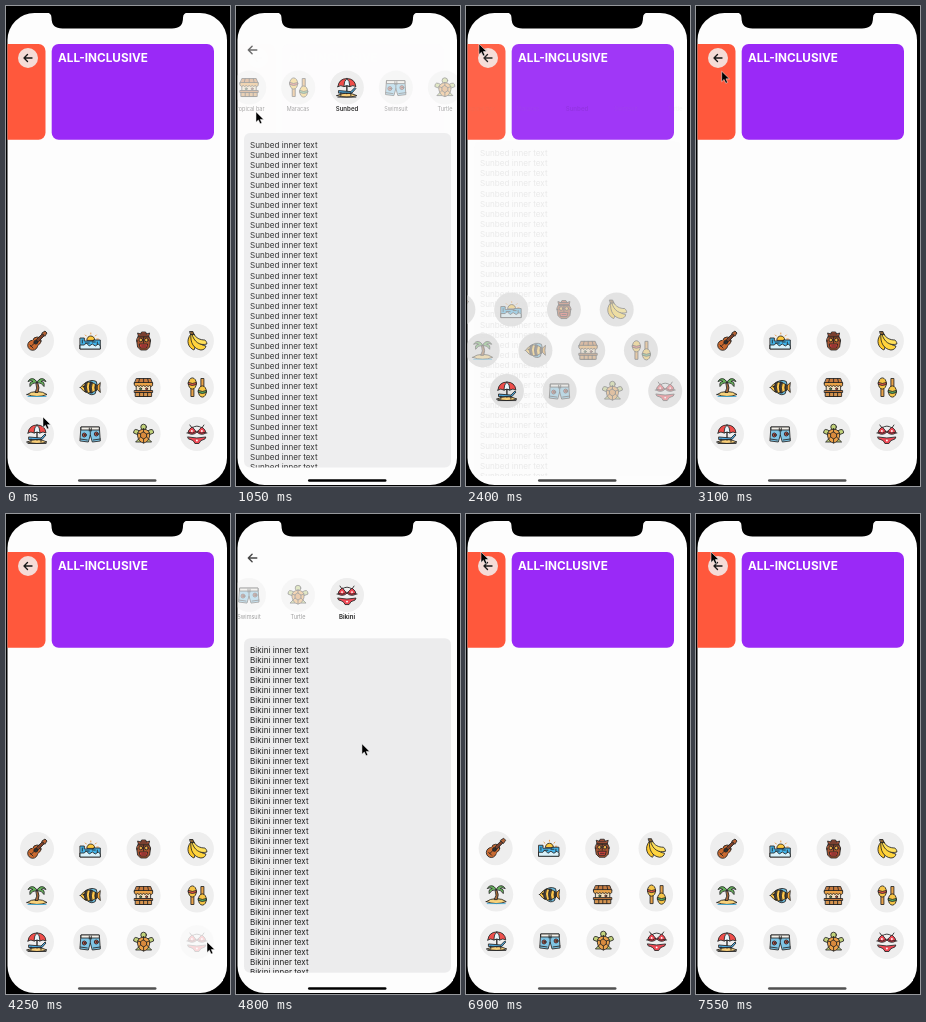
Write an HTML page that moves like this. It is 224 px wide and 480 px high and loops after 7.6 s.

```html
<!DOCTYPE html>
<html lang="en">
<head>
<meta charset="utf-8">
<title>Holiday icons</title>
<style>
html, body { margin: 0; width: 100%; height: 100%; overflow: hidden; background: #000; }
svg { display: block; font-family: Inter, sans-serif; }
#stage { width: 100vw; height: 100vh; }
.icon { stroke: #222; stroke-width: .85; stroke-linejoin: round; stroke-linecap: round; }
.label { font-size: 5.5px; fill: #9a9a9a; text-anchor: middle; }
.label.active { font-size: 6.1px; font-weight: 600; fill: #111; }
.arrow { fill: none; stroke: #181818; stroke-width: 1.4; stroke-linecap: round; stroke-linejoin: round; }
</style>
</head>
<body>
<svg id="stage" viewBox="0 0 224 480">
  <defs>
    <clipPath id="screen"><rect x="1.5" y="7" width="219.5" height="472" rx="27"/></clipPath>
  </defs>
  <rect width="224" height="480"/>
  <g clip-path="url(#screen)">
    <rect width="224" height="480" fill="#fdfdfd"/>
    <g id="cards">
      <rect x="-120" y="38" width="159.5" height="95.7" rx="7" fill="#ff583c"/>
      <rect x="45.7" y="38" width="162.3" height="95.7" rx="7" fill="#9a29f7"/>
      <text x="52" y="56" font-size="11.75" font-weight="700" fill="#fff">ALL-INCLUSIVE</text>
      <circle cx="22" cy="52" r="10" fill="#f5dcd7"/>
      <path class="arrow" d="M26 52h-8m3.5-3.5L18 52l3.5 3.5"/>
    </g>
    <path id="back" class="arrow" d="M20.8 44h-8.5m3.8-3.8L12.3 44l3.8 3.8"/>
    <g id="labels"></g>
    <g id="panel">
      <rect x="8" width="207" height="334.5" rx="6" fill="#ececed"/>
      <svg id="lines" x="8" width="207" height="334.5" font-size="8.1" fill="#151515"></svg>
    </g>
    <g id="icons"></g>
    <rect id="home" x="72" y="473.2" width="78.5" height="2.6" rx="1.3"/>
  </g>
  <path d="M40 6.5q5.5 0 5.5 5.5 0 10.5 11 10.5h109.500q11 0 11-10.500 0-5.500 5.500-5.500z"/>
  <path id="cursor" d="M0 0v10.5l2.4-2.3 1.7 3.8 1.8-.8-1.6-3.6h3.4z" stroke="#fff" stroke-width=".5"/>
</svg>
<script>
const LOOP = 7600, SPRING = 0.02, SUNBED = 8, BIKINI = 11;
const $ = id => document.getElementById(id);
const clamp = v => Math.max(0, Math.min(1, v));
const mix = (a, b, k) => a + (b - a) * k;

const path = (d, fill = 'none', extra = '') => `<path d="${d}" fill="${fill}" ${extra}/>`;
const dot = (x, y, r, fill, extra = '') => `<circle cx="${x}" cy="${y}" r="${r}" fill="${fill}" ${extra}/>`;
const bare = 'stroke="none"';

// Each icon is drawn around its own centre in a 20 x 20 box.
const items = [
  ['Guitar',
    dot(-4.3, 4.3, 5, '#c9692f') + dot(0, 0, 4, '#c9692f') + dot(-2.4, 2.4, 3.6, '#c9692f', bare) +
    path('M-.5-1.500 5.500-7.500 7.500-5.500 1.500.5z', '#7b4029') + path('M5-8 8-10 10-8 8-5z', '#b56133') +
    dot(-1.2, 1.2, 1.9, '#333') + path('M-7 4-4 7M-6 5.500l5-5')],
  ['Sunrise',
    path('M-3.500-1a4 4 0 0 1 8 0z', '#ffc83d') +
    path('M.5-7v-1M-4-5-5-6M5-5 6-6M-5.500-2H-7M6.500-2H8', 'none', 'stroke="#e58a2b"') +
    path('M-10-3h4v3H3v-1h7v9h-20z', '#43b4e9') + path('M-10 4h4l2-2 3 3 3-2 3 2 3-2 2 2v3h-20z', '#d8f2fb') +
    path('M-8-1v3M-5 2h4M2 1h3M7 1v2')],
  ['Tiki mask',
    path('M-5-4-6-8-3-7-2-9H2l1 2 3-1-1 4z', '#b9573a') +
    path('M-5-5H5l2 4-1 7-3 3h-6l-3-3-1-7z', '#a7532f') + path('M-4 3h8l-1 4h-6z', '#e9473f') +
    dot(-2.8, -1, 1.8, '#eeb04a') + dot(2.8, -1, 1.8, '#eeb04a') +
    path('M0-4v6M-5-4H5M-2 5h4M-7 0h1M6 0h1M-3-7h6')],
  ['Banana',
    path('M-6-7C-12 0-8 7-3 9-1 7-3 0-3-6z', '#ffc928') +
    path('M-6-7C-7 2-3 8 4 9 7 9 9 7 9 5 3 4-1 0-3-7z', '#ffd43d') +
    path('M-5-7C-3 1 3 5 10 3 10 1 9 0 8-1 3-1-1-3-3-7z', '#ffe05a') +
    path('M-7-9.500h3l1 3h-3z', '#8a6231')],
  ['Palm tree',
    path('M-10 7q4-3 10-3t10 3q-10 4-20 0z', '#f8d27a') + path('M-1-4q2 5-1 9h3q2-5 0-9z', '#a96a38') +
    path('M0-5C-2-10-7-10-9-6q4-2 5 0-4 0-3 5 2-4 7-4 5 0 7 4 1-5-3-5 1-2 5 0C7-10 2-10 0-5z', '#66b45b') +
    path('M-9 9h18', 'none', 'stroke="#3ca5d0"')],
  ['Fish',
    path('M6-1 10-5 9.500 0 10 5 6 1z', '#f1a43a') + path('M-5-4Q0-9 6-6L7-2M-3 5q4 4 8 1L6 2', '#68b7d8') +
    path('M-10 0Q-3-10 7-2v4Q-3 10-10 0z', '#ffc64a') +
    path('M-5-4.500q-2 4.500 0 9h2q-2-5 0-10zM0-5.500q-2 5 0 11h2q-2-5 0-10zM5-3q-1 3 0 6h1v-5z', '#403d42') +
    dot(-7, -.8, .5, '#222')],
  ['Tropical bar',
    path('M-7-3H7V9H-7z', '#f3dfbd') + path('M-7-9H7l2 5H-9z', '#c77b3f') +
    path('M-9-5H9v3q-1.500 2-3 0-1.500 2-3 0-1.500 2-3 0-1.500 2-3 0-1.500 2-3 0-1.500 2-3 0z', '#e9a247') +
    path('M-9 3H9v2H-9z', '#c47a3d') + path('M-8 5H8v4H-8z', '#d4934e') +
    path('M-4-9-5-5M0-9v4M4-9 5-5M-4 5v4M0 5v4M4 5v4') + dot(-3, 1.3, 1, '#59bd65') + dot(3, 1.3, 1, '#ee5148')],
  ['Maracas',
    path('M-6 1v8h3V1z', '#e9a247') + path('M4 0v-9h3v9z', '#e9a247') +
    `<ellipse cx="-4.500" cy="-4" rx="4" ry="5.600" fill="#f6c445"/><ellipse cx="5.500" cy="4" rx="4" ry="5.600" fill="#f6c445"/>` +
    path('M-8.400-5q4 2 7.800 0v2q-4 2-7.800 0z', '#ef574a') + path('M1.600 3q4 2 7.800 0v2q-4 2-7.800 0z', '#54b667')],
  ['Sunbed',
    path('M-10 8Q0 3 10 8q-10 3-20 0z', '#f9ce78') + path('M0-8V6', 'none', 'stroke-width="1.3"') +
    path('M-9-1Q-8-9 0-9T9-1Q6-3 3-1 0-3-3-1-6-3-9-1z', '#ef4d4a') + path('M0-9q-3 2-3 8 3-2 6 0 0-6-3-8z', '#e8f5fb') +
    path('M-8 3 4 4 8 0 9 1 5 5.500H-8z', '#4da9df') + path('M-6 5v3M4 5v3M-9 9.500H9')],
  ['Swimsuit',
    path('M-9-7H9l1 14-8 1-2-7-2 7-8-1z', '#7fc4e4') + path('M-9-7H9v3H-9z', '#f2efe7') +
    dot(-6, 1, 2, '#ef5b56') + dot(6, 0, 2, '#ef5b56') + dot(-6, 1, .6, '#ffd35a') + dot(6, 0, .6, '#ffd35a') +
    path('M-10 5l7 1M10 5 3 6M0-4v5M-1-6v3M1-6v3')],
  ['Turtle',
    path('M-4-3Q-10-7-10-1l5 2M4-3Q10-7 10-1L5 1M-4 4-8 8-3 8M4 4 8 8 3 8', '#c3d37a') +
    dot(0, -7, 2.800, '#c3d37a') + path('M0-5Q7-4 6 2 5 8 0 9-5 8-6 2-7-4 0-5z', '#eda24a') +
    path('M0-2 3 0v3L0 5-3 3V0z', '#d98a3d') + path('M0-5v3M3 0 6-1M3 3 5 5M0 5v4M-3 3-5 5M-3 0-6-1')],
  ['Bikini',
    path('M-7-9-5-6M7-9 5-6M-9-1H-10M9-1h1M-5-6Q0-10 5-6') +
    path('M-5-7Q-9-4-9-1q5 3 9-1 4 4 9 1 0-3-4-6L0-2z', '#ee4854') +
    path('M-9 3Q0 5 9 3L8 5Q3 6 2 9.500h-4Q-3 6-8 5z', '#ee4854') + path('M-8-1.500q4 2 7-1M8-1.500q-4 2-7-1') +
    dot(-5, -3, .9, '#fff', bare) + dot(5, -3, .9, '#fff', bare) + dot(0, 6.500, .9, '#fff', bare)],
];

$('icons').innerHTML = items.map(([, art]) =>
  `<g><circle r="17"/><g class="icon">${art}</g></g>`).join('');
$('labels').innerHTML = items.map(([name]) => `<text class="label" y="105.3">${name}</text>`).join('');
const iconNodes = [...$('icons').children], labelNodes = [...$('labels').children];

const transitions = [
  { at: 620, open: true, selected: SUNBED },
  { at: 2220, open: false, selected: SUNBED },
  { at: 4252, open: true, selected: BIKINI },
  { at: 6500, open: false, selected: BIKINI },
];

// time, x, y of the pointer tip
const pointer = [
  [0, 37, 411], [350, 37, 422], [660, 36, 422], [1050, 20, 106], [1350, 13, 41], [1700, 13, 38],
  [3050, 13, 38], [3400, 100, 225], [3800, 199, 426], [4000, 201, 428], [4300, 201, 428],
  [4600, 138, 262], [4800, 126, 230], [5000, 110, 190], [5400, 19, 39], [5550, 18, 36],
  [6400, 18, 36], [6600, 15, 38], [LOOP, 15, 38],
];

// move: icons from grid to row; reveal: panel slide; fade: panel and label opacity
function stateAt(t) {
  const last = transitions.filter(e => e.at <= t).pop();
  if (!last) return { move: 0, reveal: 0, fade: 0, selected: SUNBED };
  const dt = t - last.at, { selected, open } = last;
  const rest = (1 + SPRING * dt) * Math.exp(-SPRING * dt);
  if (!open) return { move: rest, reveal: rest, fade: rest ** 1.2, selected };
  const settle = Math.exp(-Math.max(0, dt - 230) / 200);
  return { move: 1 - rest, reveal: 1 - settle, fade: 1 - settle ** 2, selected };
}

const press = (t, down, up) => clamp(Math.min((t - down) / 150, 1 - (t - up) / 250));

function pointerAt(t) {
  const i = pointer.findIndex(key => key[0] > t);
  const [t0, x0, y0] = pointer[i - 1], [t1, x1, y1] = pointer[i];
  const k = (t - t0) / (t1 - t0);
  return [mix(x0, x1, k), mix(y0, y1, k)];
}

let shown = -1;
function select(index) {
  if (index === shown) return;
  shown = index;
  $('lines').innerHTML = Array.from({ length: 33 }, (_, i) =>
    `<text x="6" y="${14.6 + i * 10.08}">${items[index][0]} inner text</text>`).join('');
  labelNodes.forEach((node, i) => {
    node.setAttribute('x', 111 + 49 * (i - index));
    node.classList.toggle('active', i === index);
  });
}

function draw(t) {
  const { move, reveal, fade, selected } = stateAt(t);
  select(selected);
  const tint = 238 - 15 * Math.min(1, 8 * move * (1 - move));
  const tapped = { [SUNBED]: press(t, 470, 620), [BIKINI]: press(t, 4090, 4252) };

  iconNodes.forEach((node, i) => {
    const x = mix(31 + 53.3 * (i % 4), 111 + 49 * (i - selected), move);
    const y = mix(335 + 46.5 * Math.floor(i / 4), 81, move);
    const [disc, art] = node.children, active = i === selected;
    node.setAttribute('transform', `translate(${x} ${y})`);
    node.setAttribute('opacity', 1 - .8 * (tapped[i] || 0));
    disc.setAttribute('fill', `rgb(${tint},${tint},${tint})`);
    disc.setAttribute('opacity', active ? 1 : 1 - .55 * move);
    art.setAttribute('opacity', active ? 1 : 1 - .62 * Math.min(1, 8 * move));
  });

  $('cards').setAttribute('opacity', 1 - move ** 1.3);
  $('back').setAttribute('opacity', reveal * (1 - .8 * Math.max(press(t, 2010, 2220), press(t, 6400, 6500))));
  $('labels').setAttribute('opacity', fade);
  $('panel').setAttribute('opacity', fade);
  $('panel').setAttribute('transform', `translate(0 ${120.7 + 17 * (1 - reveal)})`);
  const shade = mix(80, 0, move);
  $('home').setAttribute('fill', `rgb(${shade},${shade},${shade})`);
  $('cursor').setAttribute('transform', `translate(${pointerAt(t)})`);
}

const start = performance.now();
function tick() {
  draw((performance.now() - start) % LOOP);
  requestAnimationFrame(tick);
}
tick();
</script>
</body>
</html>
```
